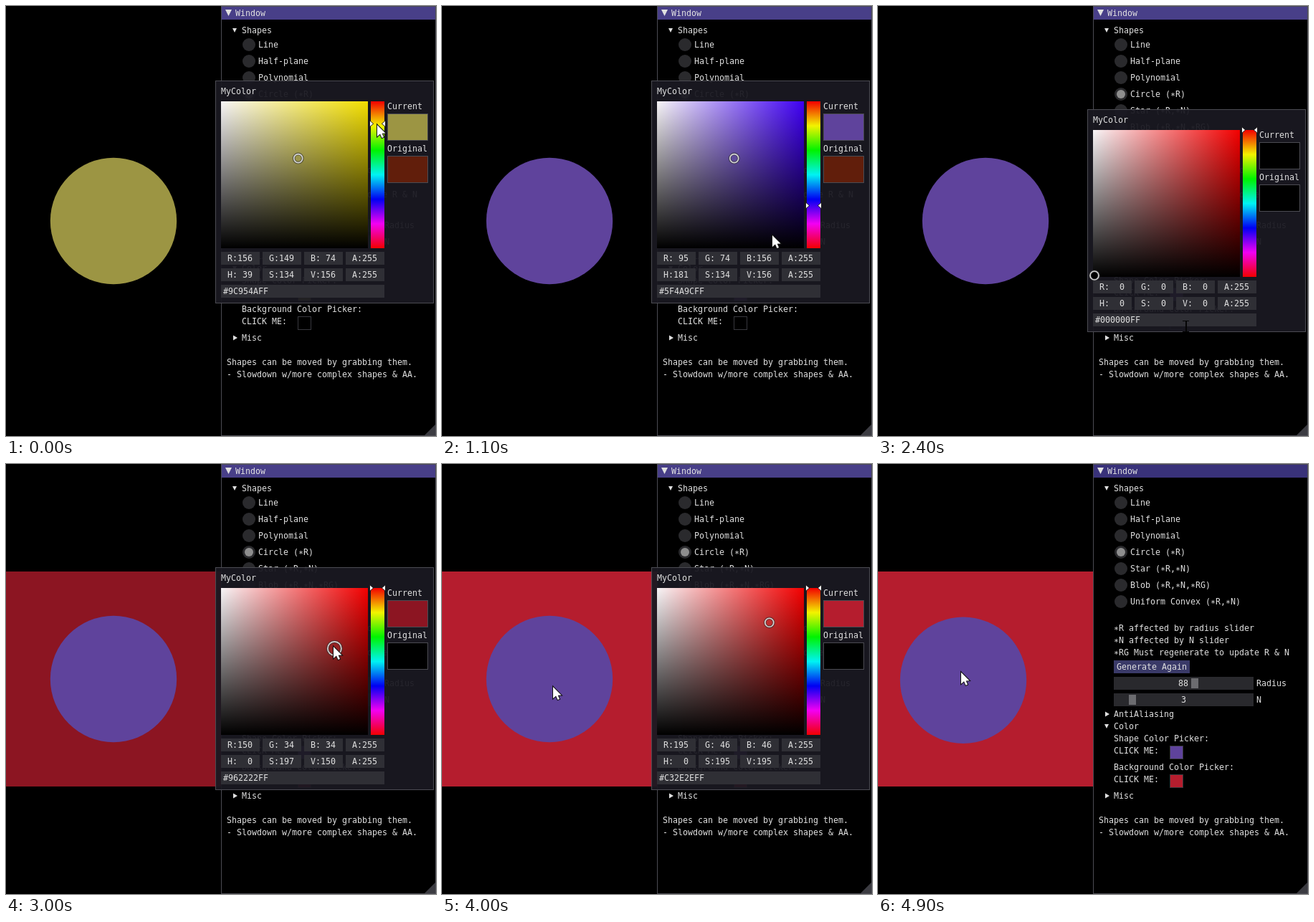
Recreate the animation shown at these times as an HTML page with a canvas. Size 600 px wide and 600 px high, loop 5 s.

```html
<!DOCTYPE html>
<html lang="en">
<head>
<meta charset="utf-8">
<title>Shape colour picker</title>
<style>
  html, body { margin: 0; width: 100%; height: 100%; overflow: hidden; background: #000; }
  canvas { display: block; width: 100%; height: 100%; }
</style>
</head>
<body>
<canvas id="stage" width="600" height="600"></canvas>
<script>
const ctx = document.getElementById('stage').getContext('2d');
const STEP = 100, STEPS = 50;
const INK = '#e0e0e0', FIELD = '#2f2f35', EDGE = '#4b4b52', DIM = '#38383e';

// Tracks: [step, ...values], linear in between
const HUE = [[0, 39], [4, 143.7], [5, 197], [6, 255], [7, 255], [8, 226], [9, 199], [10, 181]];
const TONE = [[30, 197, 150], [35, 195, 195]];
const MOUSE = [[0, 518, 166], [4, 515, 254], [6, 513, 338], [7, 513, 338], [10, 512, 283],
  [11, 461, 320], [12, 440, 385], [13, 432, 428], [15, 418, 413], [18, 417, 411],
  [19, 417, 433], [20, 417, 436], [23, 417, 436], [24, 430, 447], [29, 457, 268],
  [30, 457, 255], [35, 456, 220], [36, 450, 222], [40, 155, 311], [41, 147, 290]];
const BALL = [[41, 150, 300], [42, 128, 264], [43, 103, 250], [44, 86, 285], [45, 98, 332],
  [46, 143, 349], [47, 175, 322], [48, 148, 309], [49, 119, 301.7]];

function at(track, n) {
  const i = track.findIndex(k => k[0] > n);
  if (i === 0) return track[0].slice(1);
  if (i < 0) return track[track.length - 1].slice(1);
  const a = track[i - 1], b = track[i], f = (n - a[0]) / (b[0] - a[0]);
  return a.slice(1).map((v, j) => v + (b[j + 1] - v) * f);
}

// All channels 0..255
function hsv(h, s, v) {
  const part = k => {
    const m = (k + h / 255 * 6) % 6;
    return Math.round(v * (1 - s / 255 * Math.max(0, Math.min(m, 4 - m, 1))));
  };
  return [part(5), part(3), part(1)];
}
const css = c => `rgb(${c.map(Math.round).join()})`;
const shapeTone = c => css(c.map(v => v === Math.min(...c) ? v * 0.9 : v));
const backTone = c => css([c[0] * 0.93, c[1] * 0.63, c[2]]);
const hexa = c => '#' + [...c, 255].map(v => v.toString(16).padStart(2, '0')).join('').toUpperCase();
const pad = v => String(Math.round(v)).padStart(3);

function rect(x, y, w, h, fill, edge) {
  ctx.fillStyle = fill;
  ctx.fillRect(x, y, w, h);
  if (!edge) return;
  ctx.lineWidth = 1;
  ctx.strokeStyle = edge;
  ctx.strokeRect(x + 0.5, y + 0.5, w - 1, h - 1);
}
function disc(x, y, r, fill) {
  ctx.beginPath();
  ctx.arc(x, y, r, 0, 7);
  ctx.fillStyle = fill;
  ctx.fill();
}
function ring(x, y, r, w, color) {
  ctx.beginPath();
  ctx.arc(x, y, r, 0, 7);
  ctx.lineWidth = w;
  ctx.strokeStyle = color;
  ctx.stroke();
}
function poly(points, fill, edge, w = 2) {
  ctx.beginPath();
  points.forEach(p => ctx.lineTo(...p));
  ctx.closePath();
  if (edge) {
    ctx.lineWidth = w;
    ctx.strokeStyle = edge;
    ctx.stroke();
  }
  ctx.fillStyle = fill;
  ctx.fill();
}
// y is the middle of the capitals; asterisks sit at that height too
function text(s, x, y) {
  ctx.fillStyle = INK;
  ctx.fillText(s.replace(/\*/g, '\u2217'), x, y + 4);
}
const open = (x, y, r = 3) => poly([[x - r, y - r], [x + r, y - r], [x, y + r]], INK);
const shut = (x, y) => poly([[x - 2, y - 3.5], [x + 4, y], [x - 2, y + 3.5]], INK);

function gradient(x0, y0, x1, y1, stops) {
  const g = ctx.createLinearGradient(x0, y0, x1, y1);
  stops.forEach((c, i) => g.addColorStop(i / (stops.length - 1), c));
  return g;
}

function panel(shape, back, focused) {
  rect(300, 0, 300, 600, '#000', EDGE);
  rect(301, 1, 298, 18, focused ? '#483f88' : '#39327a');
  open(310.5, 9.5, 4.5);
  text('Window', 320, 10);
  poly([[584, 599], [599, 599], [599, 584]], '#3c3c42');

  open(319, 34);
  text('Shapes', 329, 34);
  ['Line', 'Half-plane', 'Polynomial', 'Circle (*R)', 'Star (*R,*N)', 'Blob (*R,*N,*RG)',
    'Uniform Convex (*R,*N)'].forEach((s, i) => {
    const y = 54 + 23 * i;
    disc(339, y, 9, '#2a2a2d');
    if (i === 3) disc(339, y, 6, '#8e8e8e');
    text(s, 352, y);
  });
  ['*R affected by radius slider', '*N affected by N slider',
    '*RG Must regenerate to update R & N'].forEach((s, i) => text(s, 329, 229 + 17 * i));
  rect(329, 274, 106, 18, '#3a3a68');
  text('Generate Again', 333, 283);
  [['88', 'Radius', 437, 419], ['3', 'N', 350, 423]].forEach(([v, name, grab, tx], i) => {
    const y = 297 + 23 * i;
    rect(329, y, 195, 18, '#29292d');
    rect(grab, y + 2, 10, 14, '#6c6c70');
    text(v, tx, y + 9);
    text(name, 528, y + 9);
  });
  shut(319, 349);
  text('AntiAliasing', 329, 349);
  open(319, 366);
  text('Color', 329, 366);
  [['Shape', shape], ['Background', back]].forEach(([s, c], i) => {
    const y = 383 + 40 * i;
    text(s + ' Color Picker:', 329, y);
    text('CLICK ME:', 329, y + 17);
    rect(407, y + 10, 19, 19, c, DIM);
  });
  shut(319, 463);
  text('Misc', 329, 463);
  text('Shapes can be moved by grabbing them.', 308, 497);
  text('- Slowdown w/more complex shapes & AA.', 308, 514);
}

function picker(y, h, s, v, rgb, now, before, held) {
  rect(292, y, 305, 311, 'rgba(26,25,33,.94)', EDGE);
  text('MyColor', 300, y + 15);

  const top = y + 29, size = 205, end = top + size;
  rect(300, top, size, size, css(hsv(h, 255, 243)));
  rect(300, top, size, size, gradient(300, 0, 505, 0, ['rgba(247,245,247,1)', 'rgba(247,245,247,0)']));
  rect(300, top, size, size, gradient(0, top, 0, end, ['rgba(0,0,0,0)', 'rgba(0,0,0,1)']));
  const stops = [0, 1, 2, 3, 4, 5, 6].map(i => css(hsv(i * 42.5, 255, 243)));
  rect(509, top, 19, size, gradient(0, top, 0, end, stops));

  const hy = top + h / 255 * size;
  poly([[508, hy - 3.5], [512, hy], [508, hy + 3.5]], '#fff', '#222', 1.5);
  poly([[529, hy - 3.5], [525, hy], [529, hy + 3.5]], '#fff', '#222', 1.5);

  const r = held ? 9.5 : 6;
  const rx = Math.max(302, 300 + s / 255 * size), ry = Math.min(end - 2, end - v / 255 * size);
  disc(rx, ry, r - 1, css(rgb));
  ring(rx, ry, r, 4, 'rgba(50,50,50,.6)');
  ring(rx, ry, r, 1.7, '#d4d4d4');

  [['R', rgb[0]], ['G', rgb[1]], ['B', rgb[2]], ['A', 255],
    ['H', h], ['S', s], ['V', v], ['A', 255]].forEach(([k, n], i) => {
    const x = 300 + 58 * (i % 4), fy = y + 239 + 23 * (i >> 2);
    rect(x, fy, 54, 18, FIELD);
    text(k + ':' + pad(n), x + 9, fy + 9);
  });
  rect(300, y + 285, 228, 18, FIELD);
  text(hexa(rgb), 303, y + 294);
  text('Current', 532, y + 36);
  rect(532, y + 46, 57, 38, now, EDGE);
  text('Original', 532, y + 95);
  rect(532, y + 105, 57, 38, before, EDGE);
}

function tooltip(y, rgb, fill) {
  rect(318, y, 280, 75, 'rgba(26,25,33,.94)', EDGE);
  rect(326, y + 8, 57, 57, fill, EDGE);
  const [r, g, b] = rgb.map(pad);
  ['MyColor', hexa(rgb), `R:${r}, G:${g}, B:${b}, A:255`,
    `(${[...rgb, 255].map(v => (v / 255).toFixed(3)).join(', ')})`]
    .forEach((s, i) => text(s, 391, y + 15 + 13 * i));
}

function arrow(x, y) {
  poly([[0, 0], [0, 16], [4, 12.5], [6.5, 18], [9, 17], [6.7, 11.7], [11.5, 11.5]]
    .map(p => [x + p[0], y + p[1]]), '#fff', '#111');
}
function beam(x, y) {
  rect(x - 1, y - 8, 2, 16, '#050505');
  rect(x - 5, y - 8, 9, 1, '#050505');
  rect(x - 5, y + 7, 9, 1, '#050505');
}

function draw(n) {
  ctx.font = '11.63px "DejaVu Sans Mono", monospace';
  const hue = at(HUE, n)[0] % 255;
  const shape = hsv(hue, 134, 156), shapeFill = shapeTone(shape);
  const [s, v] = n < 30 ? [0, 0] : at(TONE, n);
  const back = hsv(0, s, v), backFill = backTone(back);
  const [bx, by] = at(BALL, n);

  rect(0, 0, 600, 600, '#000');
  rect(0, 150, 300, 300, backFill);
  disc(bx, by, 88.2, shapeFill);
  panel(shapeFill, backFill, n < 41);

  if (n < 14) picker(104, hue, 134, 156, shape, shapeFill, '#611e0b', false);
  else if (n > 14 && n < 19) tooltip(437, shape, shapeFill);
  else if (n > 18 && n < 24) tooltip(460, back, backFill);
  else if (n > 23 && n < 41) picker(144, 0, s, v, back, backFill, '#000', n > 29 && n < 36);

  const [mx, my] = n > 41 ? [bx - 3, by - 11] : at(MOUSE, n);
  (n === 24 ? beam : arrow)(mx, my);
}

let last = -1;
function tick() {
  const n = Math.floor(performance.now() / STEP) % STEPS;
  if (n !== last) draw(last = n);
  requestAnimationFrame(tick);
}
tick();
</script>
</body>
</html>
```
